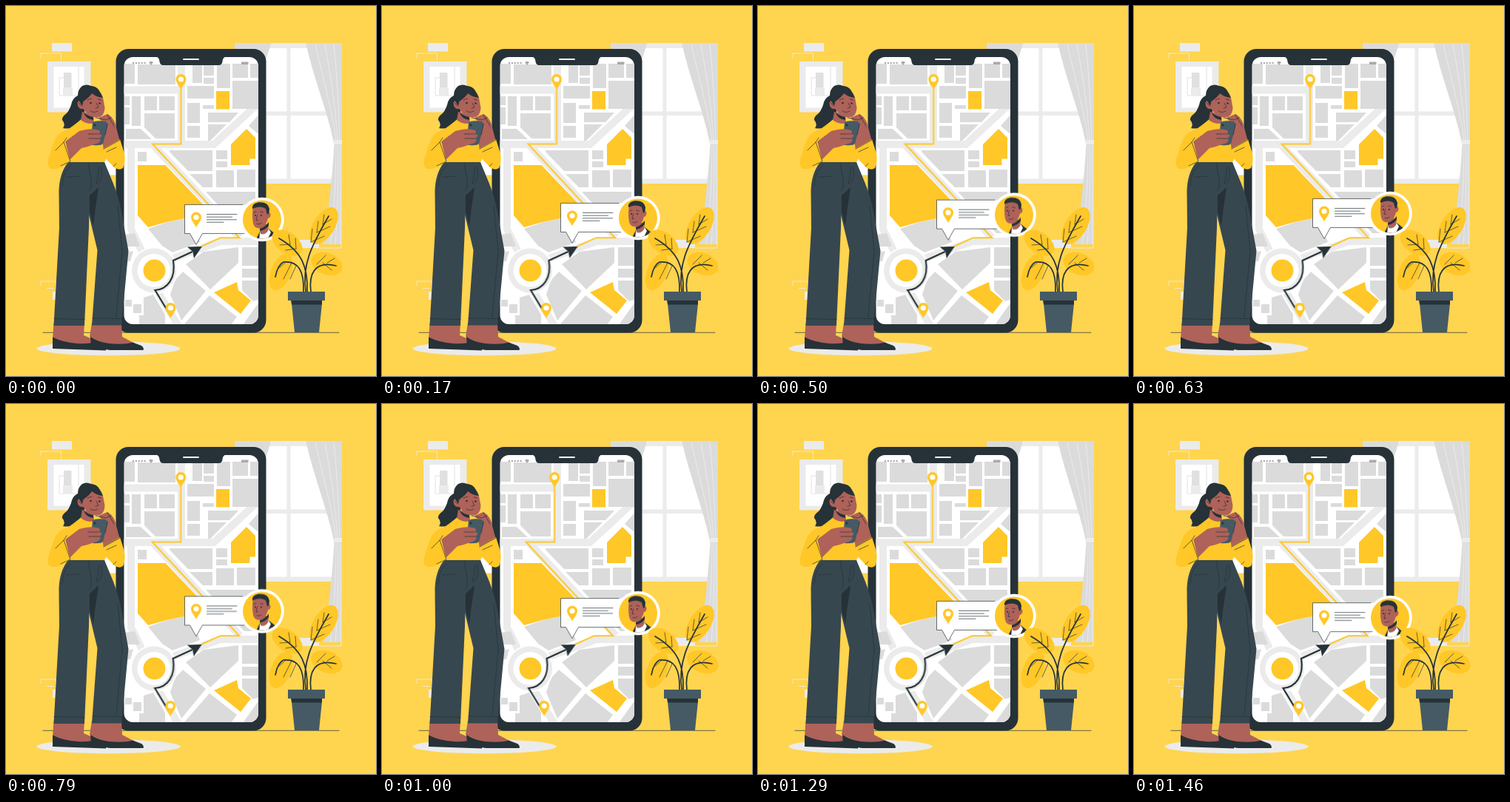
Recreate the animation shown at these times as an HTML page. Size 500 by 500 pixels, loop 1.5 s.

```html
<!DOCTYPE html>
<html lang="en">
<head>
<meta charset="utf-8">
<title>Navigation</title>
<style>
html, body { margin: 0; width: 100%; height: 100%; overflow: hidden; background: #ffd44f; }
svg { display: block; width: 100vw; height: 100vh; }
.ink { fill: none; stroke: #263238; stroke-width: .7; stroke-linecap: round; stroke-linejoin: round; }
.stem { stroke-width: 1.7; }
.gold { fill: #ffc727; }
.dark { fill: #263238; }
.skin { fill: #ae6259; }
.pale { fill: #ebebeb; }
.block { fill: #dbdbdb; }
.white { fill: #fff; }
.road { fill: none; stroke: #ebebeb; stroke-width: 10; }
#route { animation: shake 1.5s ease infinite; }
#bubble { animation: float 1.5s linear -20ms infinite; }
@keyframes shake {
  0%, 100% { transform: translateX(0); }
  10%, 90% { transform: translateX(-1px); }
  20%, 80% { transform: translateX(2px); }
  30%, 50%, 70% { transform: translateX(-4px); }
  40%, 60% { transform: translateX(4px); }
}
@keyframes float {
  0%, 100% { transform: translateY(.4px); }
  50% { transform: translateY(-9.4px); }
}
</style>
</head>
<body>
<svg viewBox="0 0 500 500">
<defs>
  <clipPath id="screen"><rect x="159.500" y="69" width="181.500" height="361" rx="12"/></clipPath>
  <clipPath id="disc"><circle cx="346" cy="288.500" r="26"/></clipPath>
  <g id="pin">
    <path class="gold" d="M0 0C-2-5-7-9-7-14A7 7 0 0 1 7-14C7-9 2-5 0 0z"/>
    <circle class="white" cy="-14" r="3.600"/>
  </g>
</defs>

<!-- room -->
<g id="room">
  <path class="pale" d="M62 50H89V61.500H62zM56 75H114.500V143.500H56zM396 316H423V327H396zM63 386H80V397H63z"/>
  <path d="M47 64H74.500V75M47 64V70M423 327H453V321M47 372H67.500V386M47 372V378M55 381.500H65" fill="none" stroke="#ebebeb" stroke-width=".9"/>
  <path class="white" d="M64.500 82H105.500V137.500H64.500zM125 200H149V228.500H125z"/>
  <path d="M72 121V97H78M72 121H98V82" fill="none" stroke="#e2e2e2"/>
  <path d="M78 90H88.500V110H78z" fill="#e0e0e0"/>
  <path class="pale" d="M77 110H90V121H77z"/>
  <path class="pale" d="M309 50H454V240H309z"/>
  <path class="white" d="M340 57H379.500V142.500H340zM384.500 57H447V142.500H384.500zM340 148H379.500V233.500H340zM384.500 148H447V233.500H384.500z"/>
  <path d="M309 50H358C354 66 348 82 340 98L309 90z" fill="#dbdbdb"/>
  <path d="M405 50H454V322H428C434 290 440 245 443.500 188C437 150 418 105 405 50z" fill="#dbdbdb"/>
  <path d="M418 52C430 105 443 150 446 184M431 52C440 100 446 145 448 184M443 52C448 100 450 145 451 184M446 188C446 240 443 285 438 322M449 188C449 240 448 285 445 322M452 188V322" fill="none" stroke="#ebebeb"/>
  <rect class="pale" x="443" y="181" width="11" height="6"/>
</g>
<path class="ink" d="M50 441.300H450"/>
<ellipse class="pale" cx="138.500" cy="462.800" rx="97" ry="9.500"/>

<!-- phone and map -->
<rect class="dark" x="148.500" y="58" width="203" height="383.500" rx="17"/>
<g clip-path="url(#screen)">
  <path class="white" d="M159 68H342V431H159z"/>
  <path class="road" d="M159 113.500H237M237 70V187M159 187H281L347 126M169 187V302L184 332M198 187L316 313M226 341L290 318H342M204 384L234 434"/>
  <path class="block" d="M160 78H174V105H160zM178 79H229V106H178zM252 80H265V104H252zM267 80H281V94H267zM267 97H281V105H267zM285 78H303V111H285zM306 78H327V97H306zM330 78H342V97H330z
    M306 101H342V139H306zM245 108H281V125H245zM245 131H262V158H245zM245 162H262V178H245zM266 134H281V139H266z
    M273 144H314L302 157H273zM273 160H298L276 182H273zM328 162L342 146V174z
    M160 122H167V134H160zM160 137H167V160H160zM170 122H182V162H170zM187 122H204V141H187zM207 122H228V141H207zM187 145H228V179H202L187 164z
    M162 166H182L197 180H162zM178 197H190V210H178z
    M221 195H279V223H246L221 197zM284 195H299V207H284zM284 210H299V218H284zM248 227H279V245H266zM284 222H308V245H284zM312 221H337V245H312z
    M270 251H337V307H322zM192 301L218 292L241 287L259 311L262 319L225 333L211 324z
    M160 309L174 307L181 325H160zM160 334L172 331L168 345H160z
    M243 349L267 332L314 326V347L276 383zM228 371L239 359L270 385L237 425L222 390z
    M319 326H342V351H319zM319 355H342V367H319zM319 371H342V396L334 399L319 384z
    M275 391L312 420L304 431H240zM342 400V431H320z
    M186 394L199 390L215 417V431H180V418H186zM172 403H183V415H172zM161 397H170V406H161z"/>
  <path class="gold" d="M284 115H302V139.500H284zM304 187L325 166L337 178V206.500H329.500V215H304z
    M178 215H215.500L269 271L241 287L217 292L192 299L178 283z
    M281 387L312 373L314 384L331 398L317 416z"/>
  <circle class="white" cx="200" cy="357.500" r="32"/>
  <circle class="pale" cx="200" cy="357.500" r="30"/>
  <circle class="white" cx="200" cy="357.500" r="22.500"/>
  <circle class="gold" cx="200.500" cy="357.500" r="15"/>
</g>
<path class="dark" d="M201 68C206 69 207 71 207.500 75Q208 80 213 80H287Q292 80 292.500 75C293 71 294 69 299 68z"/>
<path d="M240 72H260" stroke="#fff" stroke-width="1.800" stroke-linecap="round"/>
<path d="M172 77H189" stroke="#aaa" stroke-width="2.400" stroke-linecap="round" stroke-dasharray="0 3.900"/>
<path fill="#aaa" d="M193 76Q196 73.500 199 76L196 80zM318 75.500H327.500V79H318z"/>

<!-- route -->
<g id="route">
  <path d="M236.500 110V186.500H198L315.500 313.200H290L264 325" fill="none" stroke="#ffc727" stroke-width="2"/>
  <path d="M219 413L201.500 384C218 383 230 368 226 344L252 332" fill="none" stroke="#263238" stroke-width="2.200"/>
  <path class="dark" d="M265 325L254 341L252.500 332L245 325.500z"/>
  <use href="#pin" x="236.500" y="113"/>
  <use href="#pin" x="222.500" y="422"/>
</g>

<!-- message -->
<g id="bubble">
  <path class="white" d="M241.500 268.500H345V307.500H265.500L257 322.500L248.500 307.500H241.500z"/>
  <path class="ink" d="M320 268.500H241.500V307.500H248.500L257 322.500L265.500 307.500H322"/>
  <use href="#pin" transform="translate(257 299.500)"/>
  <path class="ink" d="M271.500 281.500H312M271.500 285.200H305.500M271.500 288.800H311.500M271.500 292.300H294"/>
  <circle class="white" cx="346" cy="288.500" r="29.800"/>
  <circle class="gold" cx="346" cy="288.500" r="26"/>
  <g clip-path="url(#disc)">
    <path class="dark" d="M337 317L343 305L355 301L365 309V320H337z"/>
    <path class="white" d="M342 317L343 306L354 300L358 306L352 318z"/>
    <path class="skin" d="M343 295H354.500V303Q351 310 344 308z"/>
    <path class="dark" d="M343 301Q350 299 355 292V297Q350 303 343 304z"/>
    <path class="skin" d="M334 271Q332 283 334 294Q336 301 343 300.500Q351 299 354 287Q358 286 357.500 281Q356 278 353.500 280L352 269z"/>
    <path class="dark" d="M333 274Q332 267 341 265.300Q354 264 356 274L355.500 280L353 282L351 274Q344 269 333 274z"/>
    <path class="ink" d="M335 279L338 278M343.500 278L347.500 279M339.500 283L338 289.500H340.500M339 294.500Q342 296 345 293.500"/>
    <circle class="dark" cx="337" cy="283" r="1.100"/><circle class="dark" cx="345" cy="283" r="1.100"/>
  </g>
</g>

<!-- woman -->
<g id="woman">
  <path class="skin" d="M116 428H156L157 447L174 456L140 459L113 447zM64.500 428H106L105 445L126 454L90 460L63 450z"/>
  <path class="dark" d="M114 447Q125 454 139 456Q160 458 171 454.500L183 459Q187 462 185.500 465H140L115 460z"/>
  <path class="dark" d="M63 447.500Q78 455 96 456Q113 457 122 453.500L133 458Q137 461 135 465.500L63 463z"/>
  <path d="M110 211H133L145 240Q153 260 157 284L165.500 331L156 431.500H116L123.500 330L112 282z" fill="#37474f"/>
  <path class="dark" d="M112 250L125 246L121 272L118 297L113 278z"/>
  <path d="M84 211H133L136 225L121 249L113 256L112 300L106 432H64.500L72 300L71.500 250Q72 226 84 211z" fill="#37474f"/>
  <path class="ink" d="M65 422.500L106 423.500M117 422L156.500 422.500M76 244Q76 225 87 216M129 217Q131 232 126 238L122 240L124 231L126 218M111 212L115 235Q116 244 113 250M99 230L82 231M151 270L157 331L149 421"/>
  <path class="dark" d="M97 121Q97 113 103 108Q109 105 115 108Q127 109 128 122L106 140Q107 155 98 161Q89 167 77 165Q81 160 76 154Q75 150 82 145Q87 139 89 130Q91 124 97 121z"/>
  <path class="gold" d="M104 151L117 156L135 153L150 181L133 211H86L82 182L80 169Q90 163 104 151z"/>
  <path class="skin" d="M103 143L118 147L119 158Q110 161 101 154z"/>
  <path class="dark" d="M105 144Q111 149 118 150V154Q108 153 105 144z"/>
  <path class="skin" d="M103 126Q110 126 116 117Q127 117 131 124L133.500 137Q133 150 123 150.500Q110 150 104.500 139Q97 140 96.500 132Q97 126 103 129z"/>
  <path class="dark" d="M98 127Q98 112 108 107.500Q125 107 131 124Q121 123 116.500 118Q111 125 104.500 129L103 135z"/>
  <path class="ink" d="M110 127L116 125M124 126L129 127M122 131L125 137L121 138M114 142Q119 145 124 142M98.500 131L102 135"/>
  <circle class="dark" cx="114.500" cy="131" r="1.300"/><circle class="dark" cx="126.500" cy="131.500" r="1.300"/>
  <path class="skin" d="M132 196L154 183L147 157Q142 148 137 146L125 151Q128 156 135 158L130 179z"/>
  <path d="M117 157Q123 154 134 156Q139 158 137 163L131 186Q129 189 117 188Q112 186 115 179z" fill="#455a64"/>
  <circle class="dark" cx="120" cy="161" r="1.500"/>
  <path class="skin" d="M79 184L99 169Q115 164 126 168Q129 171 124 173L129 174Q130 177 125 179L128 181Q126 186 119 187Q109 191 102 192L86 208z"/>
  <path class="ink" d="M111 173L124 173M112 179L125 179M121 151L135 154L142 151M137 160L134 174M137 147L146 162"/>
  <path class="gold" d="M80 168Q70 171 65 183L57 207Q55 217 61 220Q70 222 87 210L80 182L94 169z"/>
  <path class="gold" d="M131 193L154 180L160 199Q162 212 158 219Q153 223 146 218L132 203z"/>
  <path class="ink" d="M67 195L78 184L87 210L74 216M78 184L82 178M132 193L154 181M136 197L149 191M145 217L149 213"/>
</g>

<!-- plant -->
<g id="plant">
  <ellipse class="gold" cx="429.500" cy="297" rx="14.500" ry="28" transform="rotate(32 429.500 297)"/>
  <ellipse class="gold" cx="380" cy="320" rx="14" ry="23" transform="rotate(-55 380 320)"/>
  <ellipse class="gold" cx="371.500" cy="359.500" rx="13.500" ry="26" transform="rotate(22 371.500 359.500)"/>
  <ellipse class="gold" cx="433.500" cy="348.500" rx="14.500" ry="22" transform="rotate(-68 433.500 348.500)"/>
  <path class="ink stem" d="M402 386C403 358 395 344 375 346Q367 350 364 366M407 386C408 352 400 332 369 314M405 386C400 350 412 325 436 284M412 386C409 362 417 344 446 351"/>
  <path class="ink" d="M412 319L414 301M412 319L430 311M420 306L422 291M420 306L438 298M428 295L430 282M428 295L440 288
    M392 328L391 314M392 328L378 330M384 322L382 309M384 322L370 323
    M386 347L375 369M378 346L366 357M392 351L384 369
    M420 349L432 337M428 347L440 357M434 347L444 341"/>
  <path d="M386 402H427L423 441H390z" fill="#455a64"/>
  <path class="dark" d="M385 397H427V403.500H386z"/>
  <path d="M381 386H431V398H381z" fill="#455a64"/>
</g>
</svg>
</body>
</html>
```
